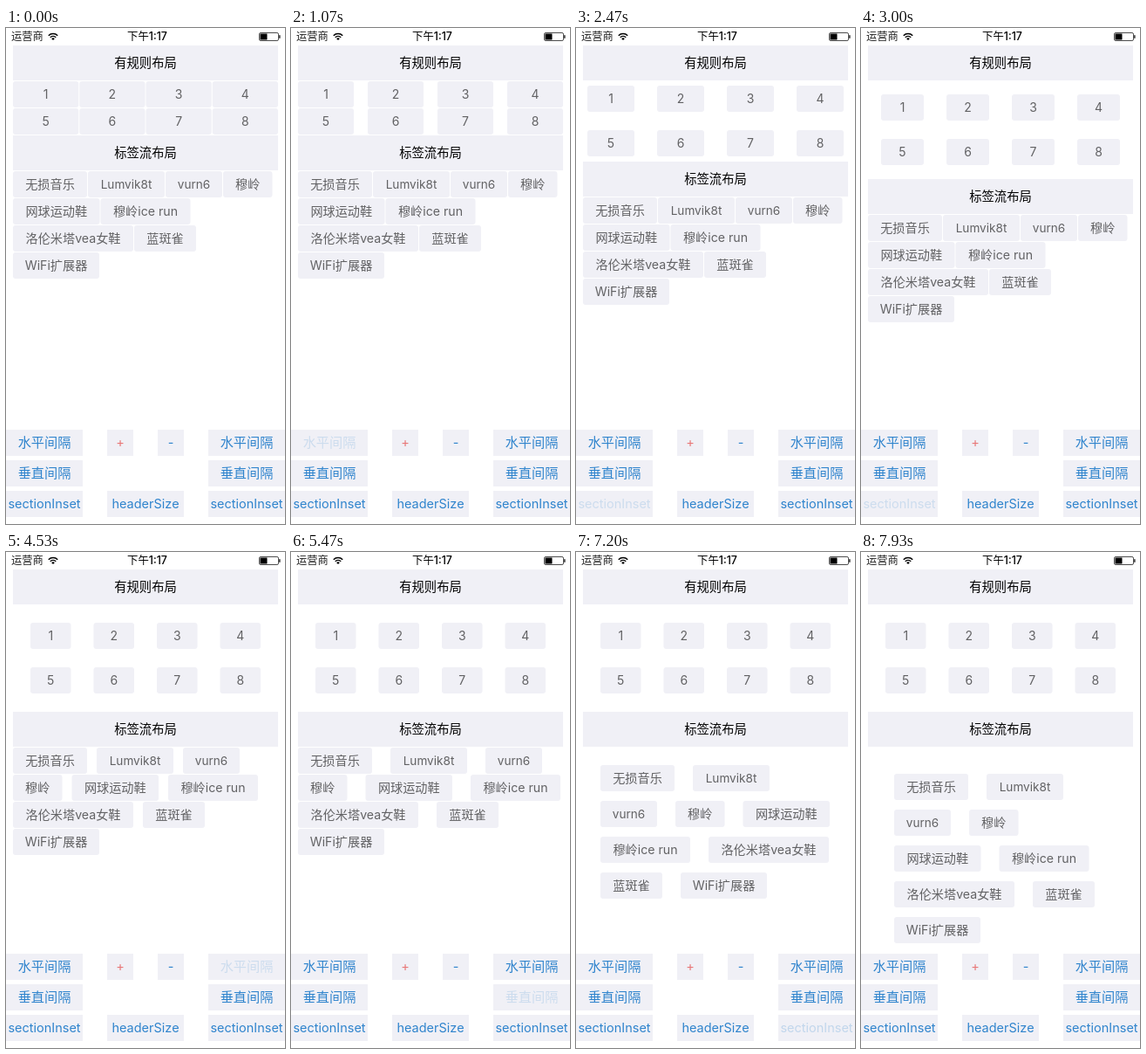
Recreate the animation shown at these times as an HTML page with a canvas. Size 320 by 568 pixels, loop 8000 ms.

```html
<!DOCTYPE html>
<html lang="zh">
<head>
<meta charset="utf-8">
<style>
  html, body { margin: 0; width: 100%; height: 100%; overflow: hidden; background: #fff; }
  canvas { display: block; width: 320px; height: 568px; }
</style>
</head>
<body>
<canvas id="stage"></canvas>
<script>
const LOOP = 8000, W = 320, H = 568;
const LEFT = 8, WIDTH = 304, ROW = 30, HEADER = 40;
const PANEL = '#f0f0f6', GREY = '#626264', BLUE = '#2f84cd', RED = '#e87878';
const FAMILY = 'Inter, "Noto Sans CJK SC", "Noto Sans CJK", sans-serif';
const DIM = 0.18, PRESS = 65, RELEASE = 470;

const canvas = document.getElementById('stage');
const ctx = canvas.getContext('2d');
const ratio = window.devicePixelRatio || 1;
canvas.width = W * ratio;
canvas.height = H * ratio;

// Tag text and tag width
const tags = [
  ['无损音乐', 85], ['Lumvik8t', 88], ['vurn6', 65], ['穆岭', 56.5],
  ['网球运动鞋', 99.5], ['穆岭ice run', 103], ['洛伦米塔vea女鞋', 138],
  ['蓝斑雀', 71], ['WiFi扩展器', 99]
];

// Each button raises one layout value by `step`; taps are [down, up] in ms
const buttons = [
  { key: 'gridX', text: '水平间隔', x: 0, y: 460, step: 5,
    taps: [[65, 465], [725, 925], [990, 1062], [1125, 1195], [1260, 1328]] },
  { key: 'gridY', text: '垂直间隔', x: 0, y: 495, step: 10,
    taps: [[1660, 1792], [1925, 1995]] },
  { key: 'gridInset', text: 'sectionInset', x: 0, y: 530, step: 5,
    taps: [[2330, 2462], [2595, 2662], [2795, 2992], [3195, 3262]] },
  { key: 'tagX', text: '水平间隔', x: 232, y: 460, step: 10,
    taps: [[3795, 3995], [4450, 4725]] },
  { key: 'tagY', text: '垂直间隔', x: 232, y: 495, step: 10,
    taps: [[5395, 5595]] },
  { key: 'tagInset', text: 'sectionInset', x: 232, y: 530, step: 10,
    taps: [[6265, 6535], [7000, 7125], [7330, 7460]] }
];

const clamp = v => Math.min(1, Math.max(0, v));
const ease = v => v * v * (3 - 2 * v);
const mix = (a, b, k) => a + (b - a) * k;
const hasHan = s => /[\u4e00-\u9fff]/.test(s);

function box(x, y, w, h, r = 0) {
  ctx.fillStyle = PANEL;
  ctx.beginPath();
  ctx.roundRect(x, y, w, h, r);
  ctx.fill();
}

function label(text, x, cy, size, color, align = 'center', weight = 400) {
  ctx.font = `${weight} ${size}px ${FAMILY}`;
  ctx.textAlign = align;
  ctx.fillStyle = color;
  ctx.fillText(text, x, cy + size * 0.36);
}

function alphaAt(taps, t) {
  let alpha = 1;
  for (const [down, up] of taps) {
    if (t < down) break;
    if (t < up) return mix(alphaAt(taps, down - 0.01), DIM, clamp((t - down) / PRESS));
    alpha = mix(DIM, 1, ease(clamp((t - up) / RELEASE)));
  }
  return alpha;
}

function layoutAt(t) {
  const values = { gridX: 1, gridY: 1, gridInset: 0, tagX: 1, tagY: 1, tagInset: 0 };
  for (const b of buttons) {
    values[b.key] += b.step * b.taps.filter(tap => t >= tap[1]).length;
  }
  return values;
}

function header(text, y) {
  box(LEFT, y, WIDTH, HEADER);
  label(text, W / 2, y + HEADER / 2, 14.3, '#000');
}

function grid(v, top) {
  const w = (WIDTH - 2 * v.gridInset - 3 * v.gridX) / 4;
  for (let i = 0; i < 8; i++) {
    const x = LEFT + v.gridInset + (i % 4) * (w + v.gridX);
    const y = top + 1 + v.gridInset + Math.floor(i / 4) * (ROW + v.gridY);
    box(x, y, w, ROW, 3);
    label(String(i + 1), x + w / 2, y + ROW / 2, 14, GREY);
  }
  return top + 2 + 2 * v.gridInset + 2 * ROW + v.gridY;
}

function flow(v, top) {
  const start = LEFT + v.tagInset, end = LEFT + WIDTH - v.tagInset;
  let x = start, y = top + 1 + v.tagInset;
  for (const [text, w] of tags) {
    if (x + w > end) {
      x = start;
      y += ROW + v.tagY;
    }
    box(x, y, w, ROW, 3);
    label(text, x + w / 2, y + ROW / 2, hasHan(text) ? 14.15 : 13.6, GREY);
    x += w + v.tagX;
  }
}

function statusBar() {
  label('运营商', 6, 10, 12.3, '#222', 'left');
  label('下午1:17', 162, 10, 12.4, '#000', 'center', 500);

  // Wi-Fi fan
  ctx.strokeStyle = ctx.fillStyle = '#000';
  ctx.lineWidth = 1.5;
  for (const r of [4.6, 7.4]) {
    ctx.beginPath();
    ctx.arc(54, 14, r, -Math.PI * 0.75, -Math.PI * 0.25);
    ctx.stroke();
  }
  ctx.beginPath();
  ctx.moveTo(54, 14);
  ctx.arc(54, 14, 2.6, -Math.PI * 0.75, -Math.PI * 0.25);
  ctx.fill();

  // Battery
  ctx.lineWidth = 0.7;
  ctx.beginPath();
  ctx.roundRect(290.5, 5.5, 22, 9, 1.6);
  ctx.stroke();
  ctx.fillRect(291.5, 6.5, 8, 7);
  ctx.fillRect(313.3, 8.2, 1.2, 3.6);
}

function button(text, x, y, w, color, alpha = 1) {
  box(x, y, w, ROW);
  ctx.globalAlpha = alpha;
  label(text, x + w / 2, y + ROW / 2, hasHan(text) ? 15.2 : 14.5, color);
  ctx.globalAlpha = 1;
}

function draw(t) {
  ctx.setTransform(ratio, 0, 0, ratio, 0, 0);
  ctx.fillStyle = '#fff';
  ctx.fillRect(0, 0, W, H);

  const v = layoutAt(t);
  statusBar();
  header('有规则布局', 20);
  const second = grid(v, 20 + HEADER);
  header('标签流布局', second);
  flow(v, second + HEADER);

  for (const b of buttons) button(b.text, b.x, b.y, 88, BLUE, alphaAt(b.taps, t));
  button('+', 116, 460, 30, RED);
  button('-', 174, 460, 30, BLUE);
  button('headerSize', 116, 530, 88, BLUE);
}

const began = performance.now();
function tick() {
  draw((performance.now() - began) % LOOP);
  requestAnimationFrame(tick);
}
tick();
</script>
</body>
</html>
```
